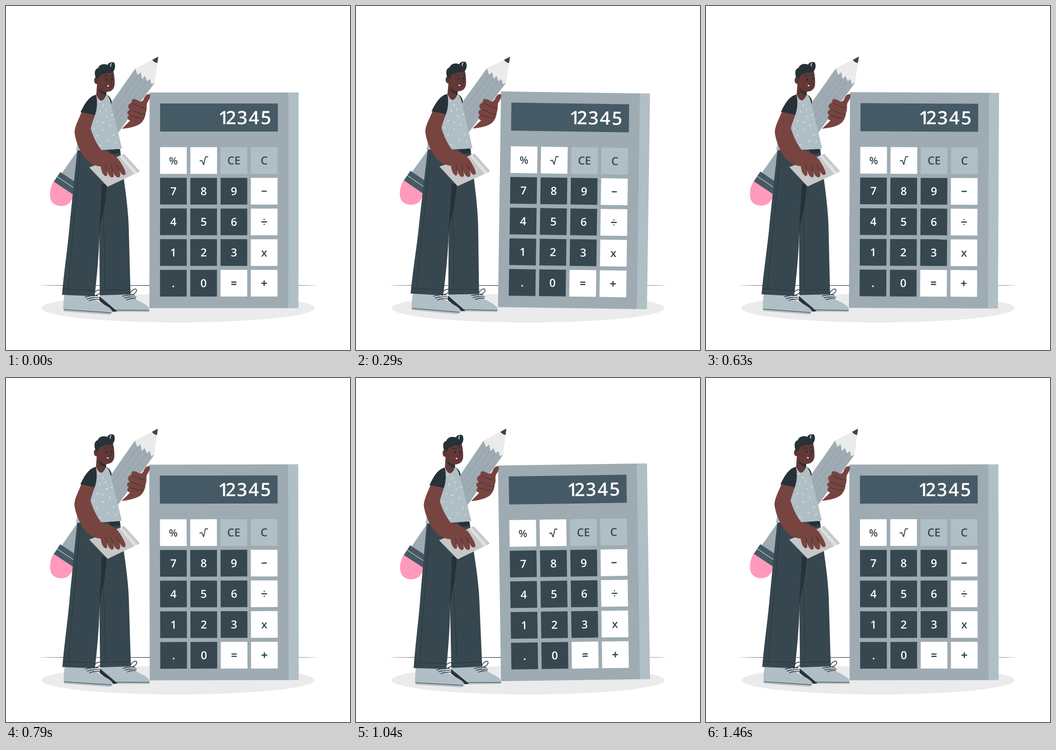
These frames come from a looping animation (748x748 px, 1500 ms). An HTML page:

```html
<!DOCTYPE html>
<html lang="en">
<head>
<meta charset="utf-8">
<title>Calculator</title>
<style>
  html, body { margin: 0; width: 100%; height: 100%; overflow: hidden; background: #fff; }
  svg { display: block; width: 100vw; height: 100vh; }
  text { font-family: "Open Sans", sans-serif; font-weight: 600; text-anchor: middle; }
  .line { fill: none; stroke: #263238; stroke-linecap: round; stroke-linejoin: round; }
  .dark { fill: #263238; }
  .slate { fill: #37474f; }
  .light { fill: #b0bec5; }
  .grey { fill: #9eabb2; }
  .skin { fill: #784440; }
  .face { fill: #633835; }
</style>
</head>
<body>
<svg viewBox="0 0 748 748">
  <ellipse cx="374" cy="657" rx="297" ry="31" fill="#ebebeb"/>
  <ellipse class="dark" cx="374" cy="607.7" rx="301" ry=".6"/>

  <g id="calculator">
    <path class="light" d="M612 188H636V657H612Z"/>
    <path class="grey" d="M312 188H614V657H312Z"/>
    <path fill="#455a64" d="M335 212H591V273H335Z"/>
    <text x="473 489 513.5 539 565" y="257" font-size="40" fill="#fff">12345</text>
    <g id="keys"></g>
  </g>

  <g id="person">
    <!-- pencil -->
    <path class="grey" d="M281 136L323 167L159 392L121 364Z"/>
    <path class="line" style="stroke:#87949b" stroke-width=".8" d="M289 149L200 271M298 155L212 273M307 161L225 273"/>
    <path fill="#ebebeb" d="M281 136L318 117L329 124L323 167L316 170L313 158L307 164L302 152L296 159L293 144L286 150Z"/>
    <path class="slate" d="M331 110L318 117Q322 123 329 124Z"/>
    <path fill="#ff9abb" d="M104 381C96 393 93 412 98 423C105 438 129 438 138 428L150 411Z"/>
    <path fill="#455a64" d="M118 361L160 389L146 410L104 382Z"/>
    <path class="line" style="stroke:#cfd8dc" stroke-width="1.2" d="M111 371L153 399"/>

    <!-- far arm -->
    <path class="skin" d="M313 193C309 189 303 194 300 201C298 206 296 208 291 208C285 203 277 201 274 204C273 209 274 211 268 213C264 217 266 224 270 226C262 227 262 235 268 238C262 240 263 247 270 249L252 267C275 265 293 259 298 249C302 243 303 238 304 231C308 222 303 214 309 207C312 202 314 197 313 193Z"/>
    <path class="line" d="M276 212C283 214 289 220 302 222M270 226C280 227 288 234 301 236M268 238C278 239 287 246 298 244"/>

    <!-- shoes -->
    <path class="light" d="M205 628L265 627C278 639 312 648 312 660L311 665L240 665L205 642Z"/>
    <path class="dark" d="M203 631L242 664L233 665L203 641Z"/>
    <path class="light" d="M127 627L184 630C195 643 231 654 231 664Q232 671 223 671L126 664Q123 658 127 627Z"/>
    <path class="line" d="M126 660L228 667M238 661L311 662"/>
    <path class="line" stroke-width="1.5" d="M172 633Q184 629 200 630M176 637Q188 633 201 634M181 641Q190 637 202 638M189 631C189 622 203 613 206 620C206 626 197 629 190 631
      M254 631Q266 627 280 629M258 635Q270 631 283 633M263 639Q272 635 282 636M269 629C271 619 282 611 284 618C284 624 276 628 269 629"/>

    <!-- trousers -->
    <path class="slate" d="M205 340L248 311L257 382Q266 445 267 485L271 627L204 629L203 490Z"/>
    <path class="slate" d="M155 314L248 311L250 365L220 385C214 430 206 465 203 500C202 545 197 595 193 631L122 628C127 570 135 520 139 470Q148 380 155 314Z"/>
    <path class="dark" d="M208 387L220 388C216 420 214 445 211 452C207 465 206 475 203 494C204 455 208 415 208 387Z"/>
    <path class="dark" d="M222 312L247 311L247 320L229 323Z"/>
    <path class="line" stroke-width=".9" d="M161 318C156 390 146 480 135 615M126 616L193 619M211 452Q216 540 215 612M205 618L271 617"/>

    <!-- head -->
    <path class="face" d="M198 145L233 140Q237 158 236 172Q234 186 218 187L219 208L203 208L196 194L198 168Z"/>
    <ellipse class="face" cx="197" cy="162" rx="5.5" ry="8"/>
    <path class="dark" d="M203 179Q208 187 218 187L218 194Q210 193 202 184Z"/>
    <path class="dark" d="M195 156C191 145 193 137 200 135C203 126 214 125 221 128C222 123 230 121 235 123C239 129 237 140 231 144Q225 147 218 145C212 150 206 147 204 152L201 159Z"/>
    <path class="line" style="stroke:#fff" stroke-width="1.5" d="M229 125Q226 128 228 131"/>
    <path class="line" d="M194 159Q198 160 198 166"/>
    <g class="dark"><ellipse cx="219" cy="160" rx="1.8" ry="3"/><ellipse cx="231" cy="159" rx="1.7" ry="3"/></g>
    <path class="line" stroke-width="1.6" d="M213 154Q216 150 221 152M227 151Q231 148 234 152"/>
    <path class="line" d="M226 156L230 168L225 169M218 171Q221 178 228 175"/>
    <path fill="#fff" d="M219 172L224 173Q224 176 221 175Z"/>

    <!-- shirt -->
    <path class="dark" d="M219 193Q228 198 230 208L227 218Z"/>
    <path class="light" d="M196 192Q207 219 218 193C223 196 226 203 228 212C235 240 245 280 252 310Q208 315 152 314L157 290L184 262Q191 230 196 192Z"/>
    <path id="sprinkles" class="line" style="stroke:#fff"/>
    <path class="dark" d="M196 193C180 196 170 214 162 231L193 238C198 225 199 210 196 193Z"/>

    <!-- notepad -->
    <path fill="#c7c7c7" d="M181 351L257 322L291 360L221 393Z"/>
    <path fill="#e0e0e0" d="M246 326L257 322L291 360L279 366Z"/>
    <path class="line" style="stroke:#8f8f8f;stroke-linecap:butt" stroke-width="6" stroke-dasharray="1 2.4" d="M255 324L289 361"/>

    <!-- near arm -->
    <path class="skin" d="M164 231L193 238C189 250 185 260 184 267C190 285 197 300 207 313C225 317 240 325 248 338C254 348 261 360 260 365C257 371 251 367 246 357C250 366 249 373 244 373C238 372 235 365 232 359C236 368 235 373 230 373C224 371 222 364 219 357C221 365 221 371 216 370C209 366 207 356 206 349C195 348 186 344 178 337C165 325 152 300 149 275C149 262 158 247 164 231Z"/>
    <path class="line" d="M219 358L217 347M232 359L229 346M246 357L240 345"/>
  </g>
</svg>
<script>
  const PERIOD = 1500, LEAD = 12;
  const $ = id => document.getElementById(id);

  const rows = ['%√CC', '789-', '456÷', '123x', '.0=+'];
  const signs = {
    '√': 'M-8 1L-4 0L0 9L4 -8H9',
    '-': 'M-4.5 0H4.5',
    '÷': 'M-5 0H5M0 -5.5V-5.4M0 5.4V5.5',
    '=': 'M-4.5 -2.5H4.5M-4.5 2.5H4.5',
    '+': 'M-5 0H5M0 -5V5'
  };

  function key(label, row, col) {
    const isDark = row > 0 && /[\d.]/.test(label);
    const isClear = label === 'C';
    const face = isDark ? '#37474f' : isClear ? '#b0bec5' : '#fff';
    const ink = isDark ? '#fff' : '#37474f';
    const caption = isClear && col === 2 ? 'CE' : label;
    const size = label === '%' ? 22 : 24;
    const mark = signs[label]
      ? `<path class="line" d="${signs[label]}" style="stroke:${ink}" stroke-width="${label === '√' ? 2 : 2.7}"/>`
      : `<text y="8.5" font-size="${size}" fill="${ink}">${caption}</text>`;
    return `<g transform="translate(${364 + col * 65.8} ${336 + row * 66.7})">
      <rect x="-29" y="-29" width="58" height="58" fill="${face}"/>${mark}</g>`;
  }
  $('keys').innerHTML = rows.map((row, r) => [...row].map((c, i) => key(c, r, i)).join('')).join('');

  const specks = [[200, 208], [212, 215], [205, 232], [218, 240], [200, 250], [226, 262], [210, 268], [236, 280],
    [198, 283], [222, 292], [207, 303], [238, 298], [191, 265], [213, 254], [229, 238], [217, 224]];
  $('sprinkles').setAttribute('d', specks.map(([x, y], i) => {
    const a = i * 2.2;
    return `M${x} ${y}l${4 * Math.cos(a)} ${4 * Math.sin(a)}`;
  }).join(''));

  // Sways evenly between 1 and -1 degree.
  function sway(ms) {
    const p = (ms + LEAD) / PERIOD % 1;
    return p < .25 ? 4 * p : p < .75 ? 2 - 4 * p : 4 * p - 4;
  }

  function draw(now) {
    const angle = sway(now);
    $('calculator').setAttribute('transform', `rotate(${angle} 474 422.5)`);
    $('person').setAttribute('transform', `rotate(${angle} 313 390)`);
    requestAnimationFrame(draw);
  }
  draw(performance.now());
</script>
</body>
</html>
```
